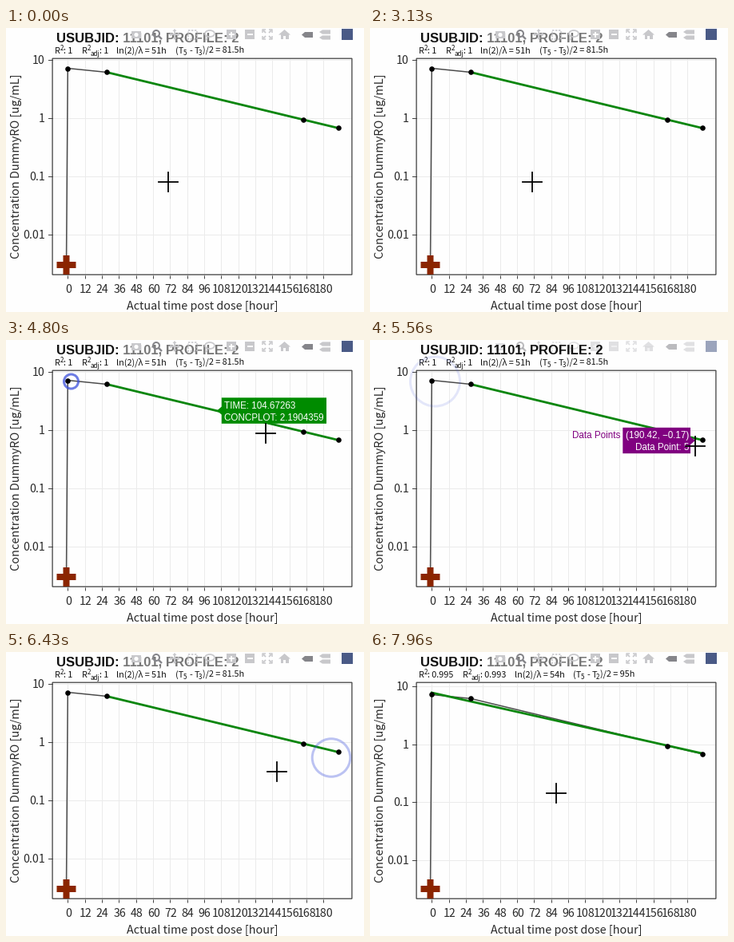
A matplotlib script that plays this animation: 448 px wide and 356 px high, repeating every 8000 ms.

```python
import numpy as np
import matplotlib.pyplot as plt
from matplotlib.animation import FuncAnimation
from matplotlib.patches import Circle, Ellipse, Polygon, Rectangle

W, H, DPI = 448, 356, 64
PX = 72 / DPI                      # points per pixel
STEP, LOOP = 40, 8000
SANS, ARIAL = "Noto Sans CJK JP", "Liberation Sans"
GREEN, PURPLE, BLUE, BROWN = "#0c870f", "#800080", "#3c50dc", "#8b2500"
DARK, PALE, ACTIVE, PAPER = "#444444", "#c8c8cb", "#85858a", "#fefefe"
BAR = 12                           # layer of the toolbar

fig = plt.figure(figsize=(W / DPI, H / DPI), dpi=DPI, facecolor=PAPER)
ax = fig.add_axes([0, 0, 1, 1])
ax.set_xlim(0, W)
ax.set_ylim(H, 0)
ax.axis("off")


def line(xs, ys, color=DARK, width=1.0, z=3, **kw):
    return ax.plot(xs, ys, color=color, lw=width * PX, zorder=z, **kw)[0]


def shape(patch, z=3):
    patch.set_zorder(z)
    return ax.add_patch(patch)


def box(x0, y0, x1, y1, z=3, **kw):
    return shape(Rectangle((x0, y0), x1 - x0, y1 - y0, **kw), z)


def text(x, y, s, size, color="#2a2a2a", font=SANS, z=4, **kw):
    return ax.text(x, y, s, fontsize=size * PX, color=color, family=font,
                   va="baseline", zorder=z, **kw)


# ---- frame, time axis and titles ----
def time_x(hours):
    return 77.3 + 1.777 * hours


hours = np.arange(0, 181, 12)
ax.vlines(time_x(hours), 39, 309, color="#ebebeb", lw=PX, zorder=1)
ax.vlines(time_x(hours), 310, 314, color=DARK, lw=PX, zorder=3)
for h in hours:
    text(time_x(h) + 0.8, 332, str(h), 14.2, ha="center")
box(58.1, 38.2, 432.9, 309.2, z=3, fill=False, ec=DARK, lw=1.3 * PX, snap=False)
text(245.5, 353, "Actual time post dose [hour]", 14.3, ha="center")
text(16.5, 173, "Concentration DummyRO [ug/mL]", 14.5, rotation=90,
     rotation_mode="anchor", ha="center")
title = text(63, 18, "USUBJID: 11101, PROFILE: 2", 16.6, "#111111", ARIAL,
             z=5, weight="bold")


# ---- the two fits ----
def subtitle(r2, adj_x, adj, life_x, life, span_x, first, span):
    out = []

    def put(x, s, dy=0, size=10.8):
        out.append(text(x - 0.6, 32 + dy, s, size, "#111111"))

    for x, gap, value in ((61, 11.5, r2), (adj_x, 23, adj)):
        put(x, "R")
        put(x + 7, "2", -4, 8)
        put(x + gap, ": " + value)
    put(adj_x + 11, "adj", 3, 8)
    put(life_x, "ln(2)/λ = " + life)
    put(span_x, "(T")
    put(span_x + 9.6, "5", 2, 8)
    put(span_x + 16.8, "-")
    put(span_x + 22.8, "T")
    put(span_x + 28.8, first, 2, 8)
    put(span_x + 33.2, ")/2 = " + span)
    return out


def chart(unit_y, decade, fit, labels):
    """Draw one state of the plot and return its artists."""
    def conc_y(log):
        return unit_y - decade * np.asarray(log)

    out = subtitle(*labels)
    for log, name in ((1, "10"), (0, "1"), (-1, "0.1"), (-2, "0.01")):
        y = conc_y(log)
        out += [line([59, 432], [y, y], "#ebebeb", z=1),
                line([53, 58], [y, y]),
                text(49, y + 5.4, name, 14.2, ha="right")]
    px = time_x(np.array([0, 27.5, 166, 190.42]))
    py = conc_y([0.856, 0.788, -0.03, -0.17])
    out.append(line(np.r_[75.5, px], np.r_[297, py], "#4a4a4a", 1.5, z=6))
    out.append(line(time_x(np.array([fit[0], 190.42])), conc_y(fit[1:]),
                    GREEN, 2.8, z=7))
    out.append(line(px, py, "black", 0, z=8, marker="o",
                    markersize=6.6 * PX, markeredgewidth=0))
    return out


charts = (
    chart(113, 73, (27.5, 0.788, -0.17),
          ("1", 95, "1", 139, "51h", 213, "3", "81.5h")),
    chart(115.5, 72.5, (0, 0.89, -0.16),
          ("0.995", 116, "0.993", 182, "54h", 255, "2", "95h")),
)
for half_w, half_h in ((12, 4), (4, 12)):
    box(75.5 - half_w, 297 - half_h, 75.5 + half_w, 297 + half_h, z=9,
        fc=BROWN, lw=0, snap=False)


# ---- toolbar ----
veil = box(145, 0, 436, 21, z=6, fc="white", alpha=0.43, lw=0)


def icon_line(xs, ys, color=PALE, width=1.8, **kw):
    return line(xs, ys, color, width, z=BAR, solid_capstyle="butt", **kw)


def tag(x, y, w, h, color):
    pts = [(x, y), (x + 4, y - h), (x + w, y - h), (x + w, y + h), (x + 4, y + h)]
    shape(Polygon(pts, fc=color, lw=0), BAR)


box(157, 4, 169, 13, z=BAR, fc=PALE, lw=0)
shape(Circle((163, 8.5), 2.6, fc="white", lw=0), BAR)
shape(Circle((188, 7), 4, fill=False, ec=ACTIVE, lw=2 * PX), BAR)
icon_line([191, 195], [10, 14], ACTIVE, 2.4)
icon_line([205, 217], [8, 8])
icon_line([211, 211], [2, 14])
for dx, dy in ((1, 0), (-1, 0), (0, 1), (0, -1)):
    tip = np.array([211 + 7 * dx, 8 + 7 * dy])
    back, side = np.array([-3 * dx, -3 * dy]), np.array([2.5 * dy, 2.5 * dx])
    shape(Polygon([tip, tip + back + side, tip + back - side], fc=PALE, lw=0), BAR)
box(227.5, 2.5, 238.5, 13.5, z=BAR, fill=False, ec=PALE, lw=1.6 * PX,
    ls=(0, (1.5, 1)))
shape(Ellipse((255, 7), 12, 8, fill=False, ec=PALE, lw=1.7 * PX), BAR)
icon_line([251, 252, 250], [10, 13, 15], width=1.4)
for x in (282, 305):
    box(x - 6, 2, x + 6, 14, z=BAR, fc=PALE, lw=0)
    icon_line([x - 3.5, x + 3.5], [8, 8], "white")
icon_line([282, 282], [4.5, 11.5], "white")
for sx in (-1, 1):
    for sy in (-1, 1):
        icon_line([327 + 2 * sx, 327 + 5 * sx], [8 + 2 * sy, 8 + 5 * sy])
        icon_line([327 + 2 * sx, 327 + 6 * sx, 327 + 6 * sx],
                  [8 + 6 * sy, 8 + 6 * sy, 8 + 2 * sy], width=1.5)
shape(Polygon([(341, 8.5), (348.5, 2), (356, 8.5)], fc=PALE, lw=0), BAR)
box(343.5, 8, 353.5, 14, z=BAR, fc=PALE, lw=0)
box(347, 10, 350, 14, z=BAR, fc="white", lw=0)
tag(370, 8.5, 14, 3.5, ACTIVE)
tag(392, 5, 14, 2.6, PALE)
tag(392, 12, 14, 2.6, PALE)
box(420, 1, 434, 15, z=BAR, fc="#4a5a86", lw=0)
icons = [a for a in ax.get_children() if a.get_zorder() == BAR]


# ---- hover labels ----
def hover(x0, y0, x1, y1, tip, color, rows, align):
    mid = (y0 + y1) / 2
    edge, far = (x0, x1) if tip < x0 else (x1, x0)
    pts = [(tip, mid), (edge, mid - 5), (edge, y0), (far, y0),
           (far, y1), (edge, y1), (edge, mid + 5)]
    at = x0 + 3 if align == "left" else x1 - 2
    out = [shape(Polygon(pts, fc=color, lw=0), 25)]
    for i, row in enumerate(rows):
        out.append(text(at, y0 + 13.5 + 15 * i, row, 11.6, "white", ARIAL,
                        z=26, ha=align))
    return out


line_label = hover(269.8, 72.3, 401, 104.8, 264, "#008b00",
                   ("TIME: 104.67263", "CONCPLOT: 2.1904359"), "left")
point_label = hover(316.3, 109.8, 401, 142.2, 407, PURPLE,
                    ("(190.42, −0.17)", "Data Point: 5"), "right")
point_label.append(text(313, 123, "Data Points", 11.6, PURPLE, ARIAL,
                        z=26, ha="right"))

# ---- fading, click rings and pointer ----
fade = box(0, 0, W, H, z=20, fc=PAPER, lw=0)
CLICKS = ((4490, 81.5, 52), (5580, 407, 132.5))
rings = [shape(Circle((x, y), 1, fill=False, ec=BLUE, lw=3 * PX), 30)
         for _, x, y in CLICKS]
cross = [line([], [], "black", 1.8, z=40) for _ in range(2)]

# start, end, from, to, sideways bow
MOVES = (
    (3460, 4200, (203, 193), (81, 52), 0),
    (4450, 4970, (81, 52), (407, 133), 21),
    (6130, 6760, (407, 133), (233, 177), 0),
)


def pointer(t):
    pos = np.array(MOVES[0][2], float)
    for start, end, a, b, bow in MOVES:
        if t >= start:
            u = min((t - start) / (end - start), 1)
            s = u * u * (3 - 2 * u)
            pos = np.array(a) + s * (np.array(b) - a)
            pos[1] += bow * s * (1 - s)
    return pos


def show(artists, on):
    for a in artists:
        a.set_visible(on)


def draw(i):
    t = i * STEP
    show(charts[0], t < 7800)
    show(charts[1], t >= 7800)
    fade.set_alpha(float(np.interp(t, [6900, 7160, 7800, 7920], [0, 0.7, 0.7, 0])))

    # the toolbar sinks behind the title while the pointer rests on a point
    level = float(np.interp(t, [5260, 5420, 5940, 6100], [1, 0.55, 0.55, 1]))
    for icon in icons:
        icon.set_alpha(level)
    veil.set_visible(level == 1)
    title.set_zorder(5 if level == 1 else BAR + 1)

    show(line_label, 4680 <= t < 4960)
    show(point_label, 5000 <= t < 6320)

    for ring, (start, _, _) in zip(rings, CLICKS):
        radius = 0.029 * (t - start)
        ring.set_visible(0 < radius < 36)
        ring.set_radius(max(radius, 0.1))
        ring.set_alpha(float(np.clip(1 - radius / 36, 0, 1)))

    x, y = pointer(t)
    cross[0].set_data([x - 12, x + 12], [y, y])
    cross[1].set_data([x, x], [y - 12, y + 12])
    return []


anim = FuncAnimation(fig, draw, frames=LOOP // STEP, interval=STEP,
                     init_func=lambda: draw(0), repeat=True)
plt.show()
```
